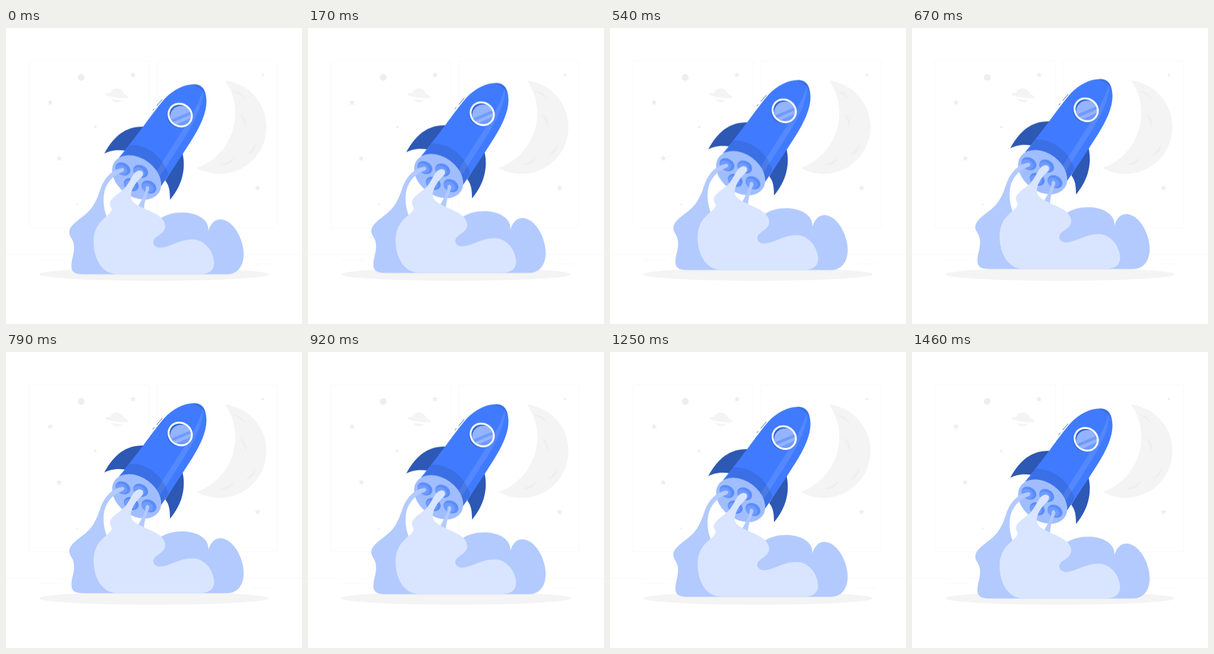
Recreate the animation shown at these times as an HTML page. Size 500 by 500 pixels, loop 1500 ms.

```html
<!DOCTYPE html>
<html lang="en">
<head>
<meta charset="utf-8">
<title>Rocket launch</title>
<style>
  html, body { margin: 0; width: 100%; height: 100%; overflow: hidden; background: #fff; }
  svg { display: block; width: 100vw; height: 100vh; }
  #launch { animation: hover 1500ms linear -30ms infinite; }
  @keyframes hover {
    0%, 100% { transform: translateY(0); }
    50% { transform: translateY(-10px); }
  }
  .frame { fill: none; stroke: #f9f9f9; }
  .grey { fill: #eee; }
  .pale { fill: #f4f4f4; }
  .shade { fill: #000; opacity: .1; }
  .fin { fill: #2d58b3; }
  .back { fill: #b3caff; }
  .front { fill: #d9e5ff; }
</style>
</head>
<body>
<svg viewBox="0 0 500 500">
  <defs>
    <path id="star" d="M0-5 1.5-1.8 5-1.4 2.4 1 3.1 4.5 0 2.8-3.1 4.5-2.4 1-5-1.4-1.5-1.8Z"/>
    <path id="body" d="M191 219 C206 201 220 182 232 166.500 C245 149 255 135 267 121 C283 103 304 94.500 320 95.500 C332 97 337.500 105 338.500 121 C340 141 329 165 314 189 C298 214 280 242 261 269 Z"/>
    <clipPath id="hull"><use href="#body"/></clipPath>
    <clipPath id="glass"><ellipse cx="294.300" cy="147.700" rx="19" ry="18"/></clipPath>
    <g id="nozzle" transform="rotate(30)">
      <ellipse rx="13.200" ry="10.200" fill="#5a8df8"/>
      <ellipse cx="-1.500" cy="2.200" rx="10.300" ry="7.600" fill="#709bff"/>
    </g>
  </defs>

  <g id="scene">
    <rect class="frame" x="39" y="55.500" width="203.500" height="282" rx="3"/>
    <rect class="frame" x="255" y="55.500" width="203.500" height="282" rx="3"/>
    <path d="M0 382.500H500M56 391.500H96M416 398.500H449" stroke="#f7f7f7" stroke-width=".8"/>

    <path class="pale" d="M370 88.500 A79.300 79.300 0 1 1 322 236.500 A97.900 97.900 0 0 0 370 88.500Z"/>
    <g class="grey">
      <path d="M382 106 C392 106 401 111 404 121 C398 113 390 110 382 106Z"/>
      <path d="M394 145 C404 150 408 159 404 168 C402 159 400 152 394 145Z"/>
      <path d="M421 195 C422 206 415 214 405 215 C412 210 417 204 421 195Z"/>
      <path d="M385 218 C383 228 374 233 362 231 C372 228 379 225 385 218Z"/>
      <circle cx="127" cy="83.500" r="5.700"/>
      <use href="#star" x="74.500" y="125.700"/>
      <use href="#star" x="214.500" y="79.300"/>
      <use href="#star" x="90" y="220"/>
      <use href="#star" x="425" y="270"/>
      <use href="#star" transform="translate(434 79.300) scale(.6)"/>
      <use href="#star" transform="translate(151 167) scale(.6)"/>
      <use href="#star" transform="translate(120 298) scale(.45)"/>
    </g>
    <path class="pale" d="M176 110 C178 104 182 102 187 102 C193 102 198 106 199 111 C206 114 208 117 206 118 C200 120 168 116 168 112 C168 110 172 109 176 110Z M178 120 C184 121 190 122 196 122 C191 127 182 127 178 120Z"/>
    <ellipse class="pale" cx="250" cy="416" rx="194" ry="11"/>
  </g>

  <g id="launch">
    <path class="fin" d="M233 167 C204 166 183 181 166 212.500 C180 206 191 206 203 208Z"/>
    <path class="fin" d="M298 211 C304 236 299 265 277 290.500 C277 276 276 267 269 258Z"/>
    <use href="#body" fill="#407bff"/>
    <g clip-path="url(#hull)">
      <path fill="#5388ff" d="M332.500 105 C335 131 314 168 283 215 L253 262 L245 257 L273 213 C304 165 325 133 332.500 105Z"/>
      <path class="shade" d="M304 94 C318 95 332 103 340 116 L342 92Z"/>
      <path class="shade" d="M208 198 C235 196 263 215 274 246 L262 290 L180 245Z"/>
    </g>
    <path d="M254.500 132 264 121M248 139.500 250.500 136.500" fill="none" stroke="#2d58b3" stroke-width="1"/>

    <ellipse cx="293" cy="149" rx="20.500" ry="19.500" fill="#3062cc"/>
    <g clip-path="url(#glass)">
      <rect x="272" y="126" width="45" height="45" fill="#3465cf"/>
      <ellipse id="pane" cx="296" cy="149.500" rx="18.500" ry="17.500" fill="#6f9bff"/>
      <clipPath id="inner"><use href="#pane"/></clipPath>
      <path clip-path="url(#inner)" d="M272 125H318V139L272 158ZM274 163 318 144V150L277 168Z" fill="#94b4ff"/>
    </g>
    <ellipse cx="294.300" cy="147.500" rx="20.200" ry="18.600" fill="none" stroke="#fff" stroke-width="3.200" transform="rotate(36 294.300 147.500)"/>

    <ellipse cx="220.700" cy="252.800" rx="45.600" ry="32.400" fill="#a0bdff" transform="rotate(36 220.700 252.800)"/>
    <use href="#nozzle" x="197.500" y="238.500"/>
    <use href="#nozzle" x="227.500" y="242.500"/>
    <use href="#nozzle" x="211.500" y="265"/>
    <use href="#nozzle" x="241.500" y="269"/>

    <path class="back" d="M196 237 C182 239 167 250 159 274 C152 295 145 308 128 320 C112 332 107 338 107 346 C107 354 115 357 115 371 C115 384 110 392 110.500 404 C111 413 118 416.500 130 416.500 H374 C391 416 401.500 403 401.500 382 C401.500 357 384 324 362 323.500 C352 323.500 345 332 342 343 C343 322 320 312 298 312 C283 312 273 315 262 321 L170 319 C164 303 163 285 168 271 C174 257 184 248 196 244 C201 242 201 237 196 237Z"/>
    <path class="back" d="M236 270 C235 281 230 289 223 302 L233 306 C234 292 238 283 242 273 C243 267 237 266 236 270Z"/>
    <path class="front" d="M222 242 C213 246 211 258 202 269 C194 279 175 287 175.500 298 C176 304 181 305 177 311 C169 322 148 329 148 362 C148 391 163 416 187 416 H328 C344 416 352 409 351.500 396 C350 375 334 357.500 315 357.500 C292 357.500 278 371 260 371.500 C251 371.500 247 364 249.500 359 C253 351 269 348 269 335 C268 317 244 311 229 303 C217 297 209 292 211 281 C213 268 222 259 230 251 C235 244 228 239 222 242Z"/>
  </g>
</svg>
</body>
</html>
```
